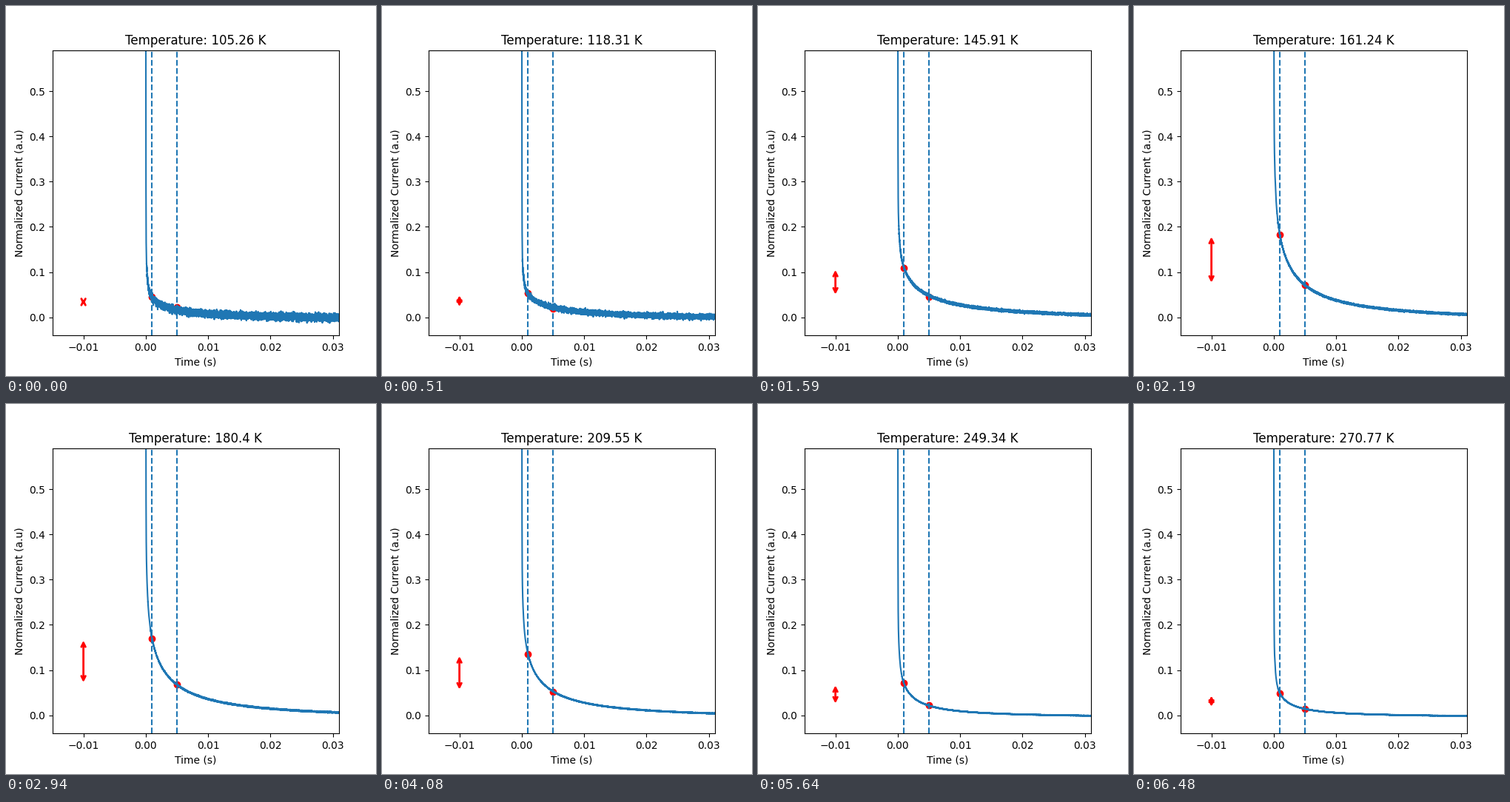
Write a matplotlib script that moves like this. It is 500 by 500 pixels and loops after 6510 ms.

```python
import numpy as np
import matplotlib.pyplot as plt
from matplotlib.animation import FuncAnimation

FRAMES, INTERVAL = 217, 30
DT = 4e-6
BETA = 0.4          # stretching exponent of the slow decay

# Key states of the sweep: temperature and current at the two gates
steps = np.array([0, 35, 73, 98, 136, 160, 216])
temps = [105.26, 132.12, 161.24, 180.4, 209.55, 227.91, 270.77]
early = [0.0445, 0.065, 0.18, 0.17, 0.135, 0.101, 0.048]
late = [0.0165, 0.031, 0.0715, 0.068, 0.0535, 0.034, 0.0145]

gates = np.array([0.001, 0.005])
gate_idx = np.round(gates / DT).astype(int)
t = np.arange(0, 0.0312, DT)
ms = t * 1000


def smooth(x, ys):
    """Cubic Hermite curve through the key states, taken in log space."""
    ys = np.log(ys)
    slope = np.gradient(ys, steps)
    k = min(np.searchsorted(steps, x, side="right") - 1, len(steps) - 2)
    h = steps[k + 1] - steps[k]
    u = (x - steps[k]) / h
    y = ((1 + 2 * u) * (1 - u) ** 2 * ys[k] + u * (1 - u) ** 2 * h * slope[k]
         + u * u * (3 - 2 * u) * ys[k + 1] + u * u * (u - 1) * h * slope[k + 1])
    return np.exp(y)


def signal(i):
    a, b = smooth(i, early), smooth(i, late)
    rate = np.log(a / b) / (5 ** BETA - 1)
    slow = a * np.exp(-rate * (ms ** BETA - 1))
    fast = 0.07 * np.exp(-ms / 0.18) + 0.8 * np.exp(-ms / 0.02)
    droop = 0.0025 * t / t[-1]
    sigma = 0.0036 * np.exp(-i / 45) + 0.0002
    rng = np.random.default_rng(i)
    return slow + fast - droop + rng.normal(0, sigma, t.size)


fig, ax = plt.subplots(figsize=(5, 5), dpi=100)
ax.set_xlim(-0.015, 0.031)
ax.set_ylim(-0.0398, 0.59)
ax.set_xticks(np.arange(-1, 4) / 100)
ax.set_xlabel("Time (s)")
ax.set_ylabel("Normalized Current (a.u)")
title = ax.set_title("")

line, = ax.plot([], [], color="C0")
dots = ax.scatter(gates, (0, 0), color="red")
for g in gates:
    ax.axvline(g, color="C0", ls="--")
arrow = ax.annotate("", xy=(-0.01, 0), xytext=(-0.01, 0.1),
                    arrowprops=dict(arrowstyle="<->", color="red", lw=2))


def update(i):
    y = signal(i)
    hi, lo = y[gate_idx]
    line.set_data(t, y)
    dots.set_offsets(np.column_stack([gates, (hi, lo)]))
    arrow.xy = (-0.01, lo)
    arrow.set_position((-0.01, hi))
    title.set_text(f"Temperature: {round(float(np.interp(i, steps, temps)), 2)} K")
    return line, dots, arrow, title


anim = FuncAnimation(fig, update, frames=FRAMES, interval=INTERVAL,
                     repeat=True, repeat_delay=0, blit=False)
plt.show()
```
